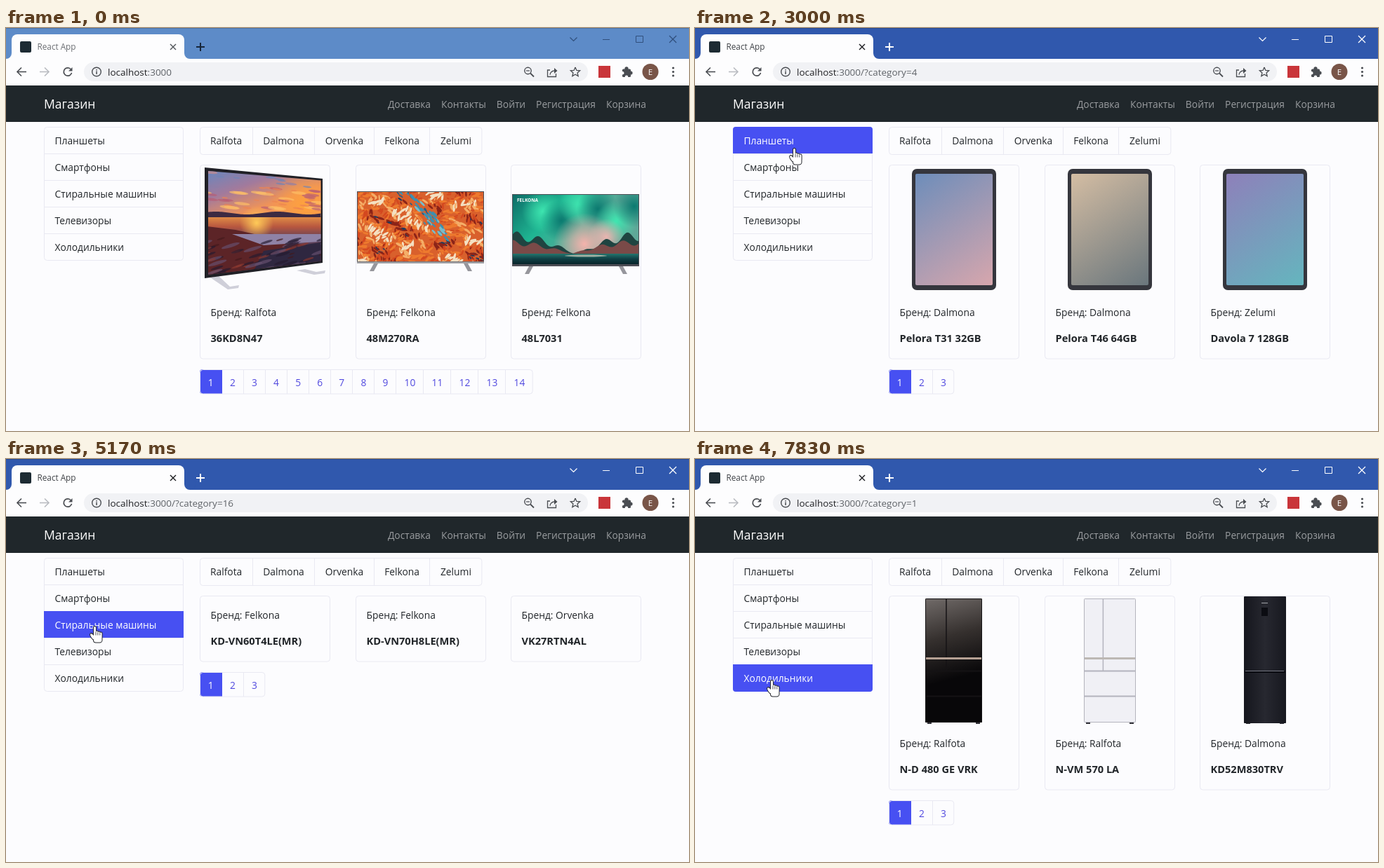
An HTML page with a canvas for the animation above (8000 ms loop, 973x575 px).

```html
<!DOCTYPE html>
<html lang="ru">
<head>
<meta charset="utf-8">
<title>Магазин</title>
<style>
html, body { margin: 0; width: 100%; height: 100%; overflow: hidden; background: #fcfcfe; }
canvas { display: block; width: 100%; height: 100%; }
</style>
</head>
<body>
<canvas id="stage" width="973" height="575"></canvas>
<script>
const ctx = document.getElementById('stage').getContext('2d');
const LOOP = 8000, STEP = 500 / 3;
const FONT = '"Open Sans", "Noto Sans", sans-serif';
const BLUE = '#4750f2', LINE = '#e9e9f2', INK = '#212529', PAPER = '#fcfcfe', ICON = '#4a4d52';
const BODY = 13.8, PAD = 15, SIZE = 183;

const LINKS = ['Доставка', 'Контакты', 'Войти', 'Регистрация', 'Корзина'];
const CATEGORIES = ['Планшеты', 'Смартфоны', 'Стиральные машины', 'Телевизоры', 'Холодильники'];
const BRANDS = ['Ralfota', 'Dalmona', 'Orvenka', 'Felkona', 'Zelumi'];
const [RALFOTA, DALMONA, ORVENKA, FELKONA, ZELUMI] = BRANDS;

// ---------- drawing helpers ----------
// Each text call returns the width it takes up.
function text(str, x, y, color = INK, size = BODY, weight = 400, align = 'left') {
  ctx.font = `${weight} ${size}px ${FONT}`;
  ctx.fillStyle = color;
  ctx.textAlign = align;
  ctx.fillText(str, x, y);
  return ctx.measureText(str).width;
}
function rect(color, x, y, w, h, r = 0) {
  ctx.fillStyle = color;
  ctx.beginPath();
  ctx.roundRect(x, y, w, h, r);
  ctx.fill();
}
function box(color, x, y, w, h, r = 0) {
  ctx.strokeStyle = color;
  ctx.lineWidth = 1;
  ctx.beginPath();
  ctx.roundRect(x, y, w, h, r);
  ctx.stroke();
}
function trace(p) {
  ctx.beginPath();
  for (let i = 0; i < p.length; i += 2) ctx.lineTo(p[i], p[i + 1]);
}
function poly(color, ...p) {
  trace(p);
  ctx.fillStyle = color;
  ctx.fill();
}
function line(color, lw, ...p) {
  trace(p);
  ctx.strokeStyle = color;
  ctx.lineWidth = lw;
  ctx.stroke();
}
function disc(color, x, y, r, ry = r, turn = 0) {
  ctx.fillStyle = color;
  ctx.beginPath();
  ctx.ellipse(x, y, r, ry, turn, 0, 7);
  ctx.fill();
}
function ring(color, x, y, r, lw, a = 0, b = 7) {
  ctx.strokeStyle = color;
  ctx.lineWidth = lw;
  ctx.beginPath();
  ctx.arc(x, y, r, a, b);
  ctx.stroke();
}
function cross(color, x, y, r, lw) {
  line(color, lw, x - r, y - r, x + r, y + r);
  line(color, lw, x + r, y - r, x - r, y + r);
}
function vline(x, y0, y1) {
  line(LINE, 1, Math.floor(x) + 0.5, y0, Math.floor(x) + 0.5, y1);
}
function fade(x0, y0, x1, y1, ...colors) {
  const g = ctx.createLinearGradient(x0, y0, x1, y1);
  colors.forEach((c, i) => g.addColorStop(i / (colors.length - 1), c));
  return g;
}
function glow(color, x, y, r) {
  const g = ctx.createRadialGradient(x, y, 0, x, y, r);
  g.addColorStop(0, color);
  g.addColorStop(1, color + '00');
  disc(g, x, y, r);
}
function clipped(p, paint) {
  ctx.save();
  trace(p);
  ctx.clip();
  paint();
  ctx.restore();
}
function scatter(n, seed, paint) {
  const rnd = () => (seed = seed * 16807 % 2147483647) / 2147483647;
  for (let i = 0; i < n; i++) paint(rnd() * SIZE, rnd() * SIZE, rnd());
}
function ridge(color, base, height) {
  const p = [0, base];
  for (let x = 0; x <= SIZE + 1; x += 2) p.push(x, base - height(x));
  poly(color, ...p, SIZE + 1, base);
}

// ---------- product pictures, in a square of SIZE ----------
function flatTv(paint) {
  for (const side of [-1, 1]) {
    const x = 92 + side * 64;
    poly('#96969c', x - 3, 140, x + 3, 140, x + 3 + side * 6, 151, x - 3 + side * 6, 151);
  }
  rect('#4d4e55', 1, 37, 181, 103);
  clipped([2, 38, 181, 38, 181, 137, 2, 137], paint);
}
function tvSunset() {
  const panel = d => [6 + d, 3 + d, 174 - d / 2, 19 + d / 2, 174 - d / 2, 139 - d / 2, 6 + d, 161 - d];
  for (const [x, y, h] of [[14, 160, 17], [137, 150, 6]]) {
    poly('#cfcfd9', x, y, x + 12, y - 2, x + 28, y + h - 4, x + 41, y + h - 6, x + 40, y + h - 2, x + 25, y + h);
  }
  poly('#202026', ...panel(0));
  clipped(panel(5), () => {
    rect(fade(20, 5, 45, 75, '#6a86bd', '#a27a9c', '#f09358'), 0, 0, SIZE, 72);
    glow('#ffa23c', 150, 58, 50);
    rect(fade(0, 70, 0, 105, '#ea9a48', '#b8573f', '#5d4058'), 0, 70, SIZE, 90);
    glow('#ffca58', 80, 82, 24);
    ridge('#3d2a42', 74, x => 6 + 2 * Math.sin(x / 14));
    poly('#5c2427', 0, 86, 50, 92, SIZE, 122, SIZE, SIZE, 0, SIZE);
    poly('#8f82a6', 45, 98, SIZE, 98, SIZE, 108, 90, 114);
    poly('#2f2740', 60, SIZE, 90, 122, SIZE, 108, SIZE, SIZE);
    const tones = {
      high: ['#6f84b8', '#8d7fa8', '#d08c8c'], low: ['#ef8450', '#b95c72', '#ffc067'],
      shore: ['#42191c', '#8e3a30', '#241a2f', '#665070'],
    };
    scatter(260, 8, (x, y, r) => {
      const zone = y < 32 ? 'high' : y < 64 ? 'low' : y > 104 ? 'shore' : null;
      if (!zone) return;
      const set = tones[zone];
      disc(set[Math.floor(r * set.length)] + 'aa', x, y, 4 + r * 10, 1 + r * 1.5, zone === 'shore' ? -0.3 : 0.12);
    });
  });
}
function tvAbstract() {
  const warm = ['#203c5e', '#8c2418', '#d4481f', '#ee7a2e', '#f5ae68', '#f4e0c2'];
  const cool = ['#235f86', '#3d8fb0', '#76bccb'];
  flatTv(() => {
    rect('#d9602c', 0, 36, SIZE, 104);
    scatter(1500, 5, (x, y, r) => {
      const flow = Math.sin(x / 11 + 2 * Math.sin(y / 9)) + Math.cos(y / 7 - x / 19);
      const river = Math.abs(x - y - 29 - 4 * Math.sin(y / 8)) < 11 && x > 55 && x < 130;
      const set = river ? cool : warm;
      const k = Math.floor((flow + 2) / 4 * (set.length - 1) + r * 1.5);
      disc(set[Math.min(k, set.length - 1)], x, y, 2 + r * 4, 0.8 + r, river ? 0.8 : flow * 1.5);
    });
  });
  rect('#a3a3a7', 1, 137.5, 181, 2.5);
}
function tvAurora() {
  ctx.translate(0, 4);
  flatTv(() => {
    rect(fade(0, 38, 90, 120, '#0c6a66', '#1fb592', '#5fa898'), 0, 36, SIZE, 104);
    for (let i = 0; i < 6; i++) {
      glow(i % 2 ? '#0b7a70' : '#3ee6b0', 45 + i * 26, 62 + 14 * Math.sin(i * 2), 30);
    }
    glow('#f4b3ac', 104, 108, 44);
    glow('#e9b5b0', 135, 98, 26);
    const hills = x => Math.abs(Math.cos(x * Math.PI / 184)) * (26 + 7 * Math.sin(x / 5));
    ridge('#1f4441', 123, hills);
    ridge('#7a4a48', 122, x => hills(x + 6) * 0.6);
    rect(fade(0, 122, 0, 137, '#23756d', '#103f44', '#08242a'), 0, 122, SIZE, 18);
    disc('#9fb0a3', 106, 125, 30, 1.5);
  });
  text('FELKONA', 8, 48, '#fff', 6.5, 700);
}
function phones(body, wall, ballA, ballB) {
  rect(body, 21, 1, 70, 181, 10);
  rect('#25242d', 27, 6, 30, 34, 7);
  for (let i = 0; i < 4; i++) {
    const x = 36 + i % 2 * 12, y = 16 + (i >> 1) * 13;
    disc('#090a10', x, y, 5);
    ring('#5a5967', x, y, 4.8, 0.8);
  }
  disc('#d9c9b1', 36, 43, 2);
  rect('#121319', 82, 1, 82, 181, 9);
  clipped([84, 4, 162, 4, 162, 176, 84, 176], () => {
    rect(wall, 84, 4, 78, 172);
    disc(ballA, 151, 36, 37);
    disc(ballB, 98, 76, 33);
    disc(ballA, 140, 138, 42);
  });
  disc('#121319', 123, 5, 5, 6);
}
function tablet(wall, shade) {
  rect('#35363d', 32, 5, 120, 173, 7);
  rect(fade(36, 12, 145, 170, wall, shade), 37, 12, 110, 159, 2);
}
function washer() {
  rect('#f1f1f4', 32, 4, 120, 174, 3);
  box('#c5c7cd', 32.5, 4.5, 119, 173, 3);
  line('#c5c7cd', 1, 32, 33, 152, 33);
  rect('#34363e', 104, 12, 38, 12, 2);
  disc('#a4a7af', 88, 18, 8);
  ['#b9bcc4', '#30343d', '#566370'].forEach((c, i) => disc(c, 92, 99, 46 - i * 9));
}
function feet(x, w) {
  for (const fx of [x + 3, x + w - 9]) rect('#33333a', fx, 179, 6, 3);
}
function multiDoor(x, w, skin, seam, strip) {
  const mid = x + w * 0.37;
  feet(x, w);
  rect(skin, x, 3, w, 177, 1);
  box(seam, x + 0.5, 3.5, w - 1, 176, 1);
  line(seam, 1.5, mid, 4, mid, 106);
  rect(strip, x + 1, 87, w - 2, 3);
  for (const y of [106.5, 142.5]) line(seam, 2, x, y, x + w, y);
}
function tallFridge() {
  feet(62, 60);
  rect(fade(62, 0, 122, 0, '#15161d', '#272830', '#17181f'), 62, 0, 60, 181, 1);
  rect('#090a10', 63, 107, 58, 2);
  rect('#777984', 64, 106, 55, 1);
  rect('#0b0c12', 87, 16, 9, 12);
  rect('#a2a4aa', 87, 9, 9, 1);
}

// ---------- pages ----------
const TVS = [
  [RALFOTA, '36KD8N47', tvSunset],
  [FELKONA, '48M270RA', tvAbstract],
  [FELKONA, '48L7031', tvAurora],
];
const ready = () => [1, 1, 1];
const late = age => age ? [1, 1, 1] : [0, 0, 0];

// from: step of the click; at: pointer tip; loaded: visible share of each picture
const PAGES = [
  { from: 0, count: 14, cards: TVS, loaded: ready },
  { from: 15, id: 4, row: 0, at: [146, 157], count: 3, loaded: late, cards: [
    [DALMONA, 'Pelora T31 32GB', () => tablet('#6d8dba', '#d6a6ad')],
    [DALMONA, 'Pelora T46 64GB', () => tablet('#d4bda3', '#6b777d')],
    [ZELUMI, 'Davola 7 128GB', () => tablet('#8e80ba', '#65b5be')],
  ] },
  { from: 24, id: 3, row: 1, at: [133, 196], count: 3, loaded: age => age ? [1, 1, 1] : [0.37, 0, 0], cards: [
    [DALMONA, 'Pelora B17 64GB', () => phones('#3b3947', '#e4dccb', '#a9cbb5', '#e3bd93')],
    [DALMONA, 'Pelora B43 128GB', () => phones('#6d93bd', '#d4e1ec', '#7faaca', '#edc8b3')],
    [DALMONA, 'Pelora N38 128GB', () => phones('#8f7fa5', '#e7dbe5', '#b59ac5', '#dda591')],
  ] },
  { from: 31, id: 16, row: 2, at: [126, 238], count: 3, loaded: late, cards: [
    [FELKONA, 'KD-VN60T4LE(MR)', washer],
    [FELKONA, 'KD-VN70H8LE(MR)', washer],
    [ORVENKA, 'VK27RTN4AL', washer],
  ] },
  { from: 38, id: 2, row: 3, at: [118, 271], count: 4, cards: TVS, loaded: ready },
  { from: 45, id: 1, row: 4, at: [109, 315], count: 3, loaded: late, cards: [
    [RALFOTA, 'N-D 480 GE VRK', () => multiDoor(51, 81, fade(51, 3, 82, 120, '#716b69', '#35302e', '#080709'), '#151315', '#b5a093')],
    [RALFOTA, 'N-VM 570 LA', () => multiDoor(55, 74, '#f0f0f5', '#b4b4bd', '#bdb8b4')],
    [DALMONA, 'KD52M830TRV', tallFridge],
  ] },
];

// ---------- browser window ----------
function arrow(color, x, dir) {
  const tip = x + dir * 6.5;
  line(color, 1.6, x - dir * 6.5, 62.5, tip, 62.5);
  line(color, 1.6, tip - dir * 6, 56.5, tip, 62.5, tip - dir * 6, 68.5);
}
function titleBar(active) {
  const bar = active ? '#3058ad' : '#5d8bc8';
  const ctl = active ? '#fff' : '#304f7c', plus = active ? '#fff' : '#17263a';
  rect(bar, 0, 0, 973, 44);
  rect('#00000030', 0, 0, 973, 1);
  rect('#fdfdfe', 0, 36, 262, 46);
  for (const x of [0, 262]) disc(bar, x, 36, 8);
  rect('#fdfdfe', 8, 9, 246, 40, 8);
  rect('#fdfdfe', 0, 44, 973, 38);
  rect('#1d2b33', 20, 19, 16, 16, 2);
  text('React App', 44.5, 31, active ? '#3d4045' : '#696c71', 11.75);
  cross(active ? '#202124' : '#55585d', 238, 27, 4, 1.5);
  line(plus, 2, 271, 27, 283, 27);
  line(plus, 2, 277, 21, 277, 33);
  line(ctl, 1.2, 803.5, 13.5, 808.5, 18.5, 813.5, 13.5);
  line(ctl, 1, 850, 16.5, 860, 16.5);
  box(ctl, 897.5, 11.5, 10, 9);
  cross(ctl, 950, 16, 5, 1.2);
}
function toolBar(id) {
  arrow(ICON, 22.5, -1);
  arrow('#b9bbc0', 54.5, 1);
  ring(ICON, 88, 62.5, 5.7, 1.7, 0.25, 5.5);
  poly(ICON, 94.5, 56, 94.5, 61.5, 89, 61.5);

  rect('#f1f2f5', 111, 49, 718, 27, 13.5);
  ring(ICON, 129, 62.5, 6.3, 1.4);
  rect(ICON, 128.3, 61.5, 1.5, 4.5);
  rect(ICON, 128.3, 59, 1.5, 1.5);
  const w = text('localhost', 145, 67.5, '#202124', 13.5);
  text(':3000' + (id ? '/?category=' + id : ''), 145 + w, 67.5, '#5f6368', 13.5);

  ring(ICON, 743.5, 61, 4.7, 1.4);
  line(ICON, 1.8, 747, 64.5, 752, 69.5);
  line(ICON, 1.2, 741, 61, 746, 61);
  line(ICON, 1.3, 775, 60, 771.5, 60, 771.5, 69.5, 783.5, 69.5, 783.5, 65);
  ring(ICON, 781, 67, 6, 1.3, 3.2, 4.7);
  poly(ICON, 781, 57, 785.5, 61, 781, 65);
  const star = [];
  for (let i = 0; i < 11; i++) {
    const r = i % 2 ? 3.2 : 7, a = i * Math.PI / 5 - Math.PI / 2;
    star.push(811 + r * Math.cos(a), 63 + r * Math.sin(a));
  }
  line(ICON, 1.3, ...star);

  rect('#c9353a', 844, 54, 17, 17);
  rect(ICON, 878, 58.5, 12, 11.5, 1.5);
  disc(ICON, 884, 57.8, 2.6);
  disc(ICON, 890, 64, 2.6);
  disc('#fdfdfe', 878.3, 64.3, 2.2);
  disc('#fdfdfe', 884, 69.8, 2.2);
  disc('#795548', 918, 62.5, 11.5);
  text('E', 918, 66.7, '#fff', 11.5, 400, 'center');
  for (let i = -1; i < 2; i++) disc(ICON, 950.5, 62.5 + i * 5.5, 1.6);
}

// ---------- shop page ----------
function menus(row) {
  rect('#20272b', 0, 82, 973, 52);
  text('Магазин', 54, 115, '#fff', 17.5);
  let x = 912;
  for (const name of LINKS.toReversed()) x -= text(name, x, 114, '#9a9da0', BODY, 400, 'right') + PAD;

  box(LINE, 54.5, 141.5, 198, 190, 4);
  CATEGORIES.forEach((name, i) => {
    const y = 141 + Math.round(i * 37.9), on = i === row;
    const top = i === 0 ? 4 : 0, end = i === 4 ? 4 : 0;
    if (i) line(LINE, 1, 54, y + 0.5, 253, y + 0.5);
    if (on) rect(BLUE, 54, y, 199, 39, [top, top, end, end]);
    text(name, 69.5, 166 + i * 37.9, on ? '#fff' : INK);
  });

  x = 276;
  BRANDS.forEach((name, i) => {
    if (i) vline(x, 141, 181);
    x += text(name, x + PAD, 166) + 2 * PAD;
  });
  box(LINE, 276.5, 141.5, x - 276.5, 39, 4);
}
function products(cards, shares) {
  cards.forEach(([brand, model, picture], i) => {
    const x = Math.round(276 + 221.6 * i) + 0.5, dy = shares[i] ? SIZE : 0;
    box(LINE, x, 195.5, 185, 93.5 + dy, 4);
    ctx.save();
    ctx.translate(x + 0.5, 196);
    clipped([0, 0, 184, 0, 184, SIZE * shares[i], 0, SIZE * shares[i]], picture);
    ctx.restore();
    text('Бренд: ' + brand, x + PAD, 227.5 + dy);
    text(model, x + PAD, 264.5 + dy, INK, 14.6, 700);
  });
}
function pager(count, top) {
  let x = 276;
  for (let n = 1; n <= count; n++) {
    if (n === 1) rect(BLUE, x, top, 32, 35, [4, 0, 0, 4]);
    if (n > 2) vline(x, top, top + 35);
    x += text(n, x + 11.8, top + 23.5, n === 1 ? '#fff' : '#5149df') + 23.2;
  }
  box(LINE, 276.5, top + 0.5, x - 277, 34.5, 4);
}

// ---------- pointer ----------
const ROUTE = [[1, 352, 562], [6, 274, 306], [9, 213, 232]];
for (const { from, at } of PAGES.slice(1)) {
  ROUTE.push([Math.min(from - 1, ROUTE.at(-1)[0] + 5), ...at], [from + 1, ...at]);
}
ROUTE.push([LOOP, ...ROUTE.at(-1).slice(1)]);

const ARROW = new Path2D('M0 0V16.5L3.8 13L6.4 19L9.2 17.8L6.6 12H12Z');
const HAND = new Path2D();
HAND.roundRect(-1.5, 0.5, 3, 16, 1.5);
HAND.roundRect(-1.5, 11, 11.5, 12, [0, 0, 3, 3]);
HAND.ellipse(-3, 15, 2, 5, -0.6, 0, 7);
for (let i = 0; i < 3; i++) HAND.roundRect(1.5 + i * 2.9, 7 + i, 2.8, 9, 1.4);

function pointer(step) {
  const k = ROUTE.findIndex(p => p[0] > step);
  if (k < 1) return;
  const [s0, x0, y0] = ROUTE[k - 1], [s1, x1, y1] = ROUTE[k];
  const u = (step - s0) / (s1 - s0), e = u * u * (3 - 2 * u);
  const x = Math.round(x0 + (x1 - x0) * e), y = Math.round(y0 + (y1 - y0) * e);
  const onList = x > 54 && x < 253 && y > 141 && y < 332;
  const shape = onList ? HAND : ARROW;
  ctx.save();
  ctx.translate(x + 0.5, y + 0.5);
  ctx.strokeStyle = '#24262c';
  ctx.lineWidth = 2;
  ctx.stroke(shape);
  ctx.fillStyle = '#fff';
  ctx.fill(shape);
  if (onList) for (let i = 0; i < 3; i++) line('#24262c', 0.8, 1.5 + i * 2.9, 8 + i, 1.5 + i * 2.9, 13);
  ctx.restore();
}

function draw(step) {
  const page = PAGES.findLast(p => p.from <= step);
  const shares = page.loaded(step - page.from);
  rect(PAPER, 0, 0, 973, 575);
  titleBar(step >= 13);
  toolBar(page.id);
  menus(page.row);
  products(page.cards, shares);
  pager(page.count, Math.max(...shares) ? 487 : 304);
  pointer(step);
}

let shown = -1;
const start = performance.now();
function tick() {
  const t = (performance.now() - start) % LOOP;
  const step = Math.min(47, Math.floor((t + 3.4) / STEP));
  if (step !== shown) draw(shown = step);
  requestAnimationFrame(tick);
}
tick();
</script>
</body>
</html>
```
